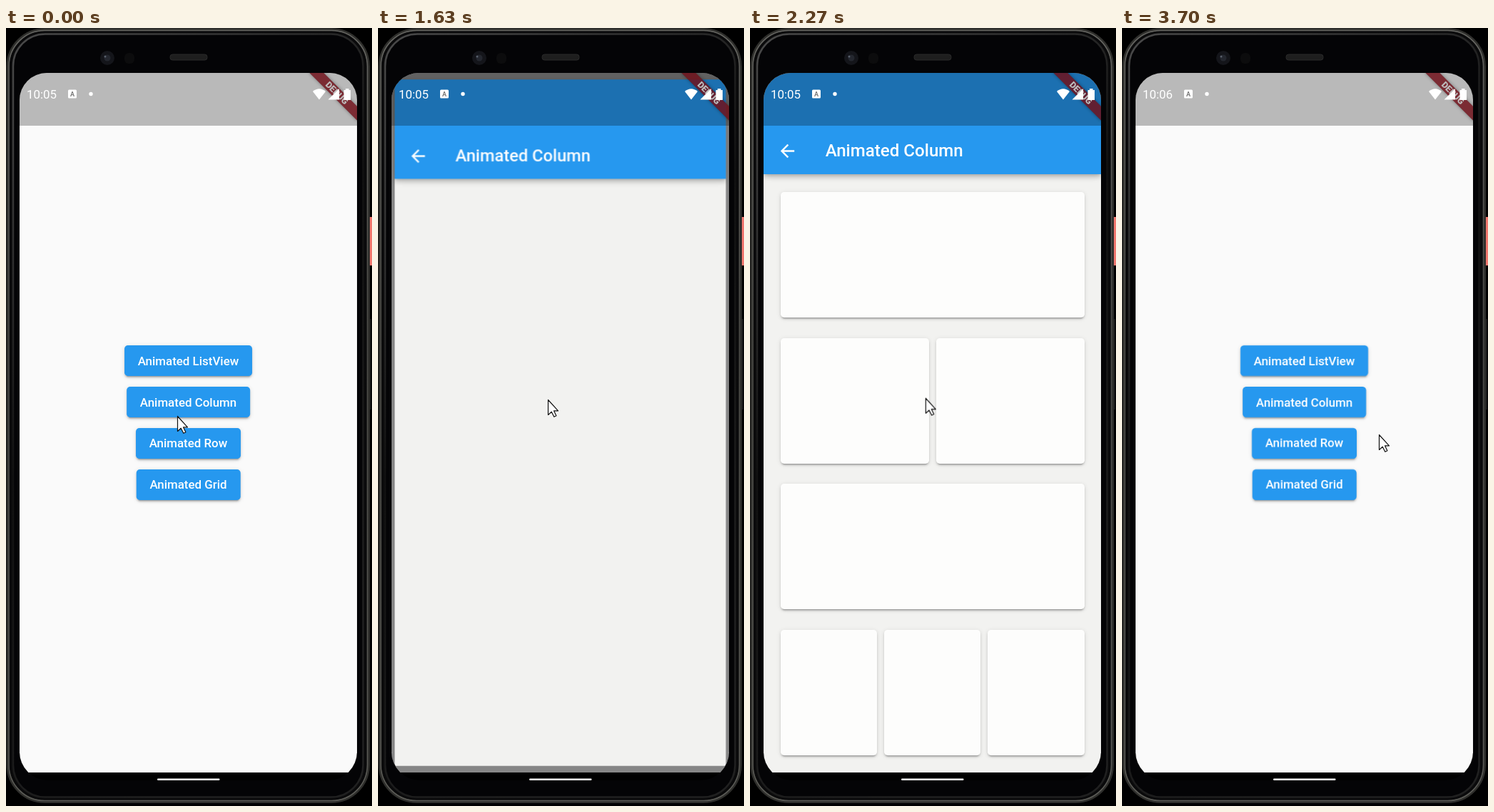
An HTML page for the animation above (3730 ms loop, 513 px wide and 1091 px high).

```html
<!DOCTYPE html>
<html lang="en">
<head>
<meta charset="utf-8">
<title>Animated Column</title>
<style>
  html, body { margin: 0; width: 100%; height: 100%; overflow: hidden; background: #000; }
  body { position: relative; font-family: Roboto, sans-serif; color: #fff; }
  body *, body *::before, body *::after { box-sizing: border-box; }
  .layer { position: absolute; left: 0; top: 0; }
  .loop, .loop::after { animation: 3730ms linear infinite both; }

  .display { position: absolute; left: 19px; top: 63px; width: 473px; height: 992px;
    border-radius: 38px 38px 40px 40px; overflow: hidden; background: #000; }
  .app { position: absolute; inset: 0 0 auto; height: 981px; overflow: hidden; }
  .app > * { position: absolute; }
  .home, .scrim, .page { inset: 0; }

  .home { background: #fafafa; animation-name: home; }
  .button { position: absolute; left: 50%; transform: translateX(-50%); height: 43px;
    padding: 0 19.2px; display: flex; align-items: center; white-space: nowrap; overflow: hidden;
    font-size: 16.9px; font-weight: 500; }
  .button, .card { border-radius: 4.8px;
    box-shadow: 0 3.6px 1.2px -2.4px #0003, 0 2.4px 2.4px #00000024, 0 1.2px 6px #0000001f; }
  .button, .bar { background: #2698ef; }
  .hover::after { content: ""; position: absolute; inset: 0; background: #fff; animation-name: hover; }
  .ripple { position: absolute; left: 70px; top: 19px; width: 0; height: 0; }
  .ripple::after { content: ""; position: absolute; left: -88px; top: -88px; width: 176px; height: 176px;
    border-radius: 50%; background: #fff; animation-name: ripple; }

  .scrim { background: #000; animation-name: scrim; }
  .page { background: #f2f2f0; animation-name: zoom, fade; }
  .bar { position: absolute; inset: 0 0 auto; height: 142px;
    box-shadow: 0 2.4px 4.8px -1.2px #0003, 0 4.8px 6px #00000024, 0 1.2px 12px #0000001f; }
  .bar svg { position: absolute; left: 19px; top: 94.5px; width: 29px; height: 29px; }
  .bar b { position: absolute; left: 86.7px; top: 76px; line-height: 67px; font-size: 24.1px; font-weight: 500; white-space: nowrap; }
  .row { position: absolute; left: 24px; width: 425.5px; height: 176px; display: flex; gap: 9.6px;
    top: calc(167px + var(--row) * 204.5px); animation-name: rise; animation-delay: calc(var(--turn) * 56ms); }
  .card { flex: 1; background: #fdfdfc; }

  .banner { left: 100%; top: 0; transform: rotate(45deg); transform-origin: 0 0; }
  .banner b { position: absolute; left: -48px; top: 33px; width: 96px; height: 14.4px; line-height: 14.4px;
    text-align: center; font-size: 12.3px; font-weight: 900; background: #b71c2cb0; }
  .banner b::before { content: ""; position: absolute; inset: 0; z-index: -1; background: #0000007f; box-shadow: 0 0 5px #00000060; }
  .shade { inset: 0 0 auto; height: 74px; background: #00000042; }

  .clock { position: absolute; left: 29px; top: 83px; font-size: 16.9px; line-height: 20px; }
  .digit { position: relative; }
  .digit span + span { position: absolute; left: 0; top: 0; line-height: 20px; }
  .before { animation-name: before; }
  .after { animation-name: after; }
  .cursor { animation-name: cursor; }

  @keyframes home {
    0%, 40.48% { transform: none; animation-timing-function: cubic-bezier(.05, 0, .1333, .06); }
    41.82% { transform: scale(1.02); animation-timing-function: cubic-bezier(.2083, .82, .25, 1); }
    48.53%, 89.99% { transform: scale(1.05); }
    90% { transform: scale(1.1); animation-timing-function: cubic-bezier(.05, 0, .1333, .06); }
    91.34% { transform: scale(1.06); animation-timing-function: cubic-bezier(.2083, .82, .25, 1); }
    98.04%, 100% { transform: none; }
  }
  @keyframes zoom {
    0%, 40.48% { transform: scale(.85); animation-timing-function: cubic-bezier(.05, 0, .1333, .06); }
    41.82% { transform: scale(.91); animation-timing-function: cubic-bezier(.2083, .82, .25, 1); }
    48.53% { transform: none; }
    90% { transform: none; animation-timing-function: cubic-bezier(.05, 0, .1333, .06); }
    91.34% { transform: scale(.96); animation-timing-function: cubic-bezier(.2083, .82, .25, 1); }
    98.04%, 100% { transform: scale(.9); }
  }
  @keyframes fade {
    0%, 41.49% { opacity: 0; }
    42.49%, 90.67% { opacity: 1; }
    91.66%, 100% { opacity: 0; }
  }
  @keyframes scrim {
    0%, 42.15% { opacity: 0; }
    43.84%, 48.5% { opacity: .5; }
    48.54%, 100% { opacity: 0; }
  }
  @keyframes rise {
    0%, 44.29% { transform: translateY(120px); opacity: 0; animation-timing-function: ease; }
    54.34%, 100% { transform: none; opacity: 1; }
  }
  @keyframes hover {
    0%, .8% { opacity: 0; }
    6%, 60% { opacity: .05; }
    60.1%, 100% { opacity: 0; }
  }
  @keyframes ripple {
    0%, 36.2% { opacity: 0; transform: scale(.28); }
    38.2% { opacity: .2; }
    42.2%, 48% { opacity: .2; transform: none; }
    48.1%, 100% { opacity: 0; transform: none; }
  }
  @keyframes before { 0%, 74.25% { opacity: 1; } 74.26%, 100% { opacity: 0; } }
  @keyframes after { 0%, 74.25% { opacity: 0; } 74.26%, 100% { opacity: 1; } }
  @keyframes cursor {
    0%, .6% { transform: translate(240px, 544px); animation-timing-function: ease-in-out; }
    8.04%, 60.05% { transform: translate(238px, 521px); }
    60.86% { transform: translate(245px, 519px); }
    62.5% { transform: translate(295px, 500px); }
    64.3% { transform: translate(372px, 491px); }
    66% { transform: translate(447px, 506px); }
    67.83%, 93% { transform: translate(516px, 540px); animation-timing-function: ease-out; }
    98.7%, 100% { transform: translate(360px, 570px); }
  }
</style>
</head>
<body>
  <svg class="layer" width="513" height="1091" fill="none">
    <defs>
      <linearGradient id="rim" x2="0" y2="1">
        <stop stop-color="#666662"/><stop offset=".4" stop-color="#4a4a46"/><stop offset="1" stop-color="#5c5c57"/>
      </linearGradient>
      <linearGradient id="gleam" x2=".4" y2="1">
        <stop stop-color="#4a4a4a"/><stop offset=".3" stop-color="#2a2a2a"/><stop offset=".5" stop-color="#111"/><stop offset="1" stop-color="#202020"/>
      </linearGradient>
    </defs>
    <path d="M509 408h3v127h-3z" fill="#161616"/>
    <path d="M509.500 265h3.500v68h-3.500z" fill="#f0776e"/>
    <rect x="2.500" y="2" width="505.500" height="1083" rx="52" fill="#0a0a0b" stroke="#2f2f2c" stroke-width="4"/>
    <rect x="4" y="3.500" width="502.500" height="1080" rx="50" stroke="url(#rim)" stroke-width="1.500"/>
    <rect x="10" y="8.500" width="490.500" height="1070" rx="45" fill="#040406" stroke="url(#gleam)" stroke-width="2.500"/>
    <circle cx="142" cy="42" r="10" fill="#14151a"/>
    <circle cx="142" cy="42" r="4.5" fill="#24272f"/>
    <circle cx="139" cy="40" r="1.5" fill="#59616c"/>
    <rect x="166" y="35" width="14" height="15" rx="6" fill="#0c0c0d"/>
    <rect x="230" y="37" width="52" height="8" rx="3.5" fill="#1e1e1e" stroke="#2b2b2b"/>
  </svg>

  <div class="display">
    <div class="app">
      <div class="home loop">
        <div class="button" style="top:382.2px">Animated ListView</div>
        <div class="button hover loop" style="top:440px"><i class="ripple loop"></i>Animated Column</div>
        <div class="button" style="top:497.8px">Animated Row</div>
        <div class="button" style="top:555.6px">Animated Grid</div>
      </div>
      <div class="scrim loop"></div>
      <div class="page loop">
        <div class="row loop" style="--row:0;--turn:0"><i class="card"></i></div>
        <div class="row loop" style="--row:1;--turn:0"><i class="card"></i><i class="card"></i></div>
        <div class="row loop" style="--row:2;--turn:1"><i class="card"></i></div>
        <div class="row loop" style="--row:3;--turn:2"><i class="card"></i><i class="card"></i><i class="card"></i></div>
        <div class="bar">
          <svg viewBox="0 0 24 24" fill="#fff"><path d="M20 11H7.83l5.59-5.59L12 4l-8 8 8 8 1.41-1.41L7.83 13H20z"/></svg>
          <b>Animated Column</b>
        </div>
      </div>
      <div class="banner"><b>DEBUG</b></div>
      <div class="shade"></div>
    </div>
  </div>

  <div class="clock">10:0<span class="digit"><span class="before loop">5</span><span class="after loop">6</span></span></div>
  <svg class="layer" width="513" height="1091" fill="#fff">
    <rect x="87" y="86.5" width="12" height="12" rx="1.5"/>
    <text x="93" y="96" text-anchor="middle" font-size="9" font-weight="700" fill="#777">A</text>
    <circle cx="119" cy="92.5" r="2.7"/>
    <path d="M430 89Q439 81.500 448 89L439 100.500Z"/>
    <path d="M467 85V100.500H451.500Z"/>
    <path d="M473.500 87h2.500v-2h4.500v2h2.500v14h-9.500z"/>
    <rect x="212" y="1052.500" width="87.500" height="2.500" rx="1.200"/>
  </svg>

  <svg class="layer cursor loop" width="18" height="28" style="overflow:visible">
    <path d="M.5 .5V21.500L5.200 17.200 8.800 24.300 11.900 22.800 8.500 15.800H14.500Z" fill="#fff" stroke="#111" stroke-width="1.200" stroke-linejoin="round"/>
  </svg>
</body>
</html>
```
